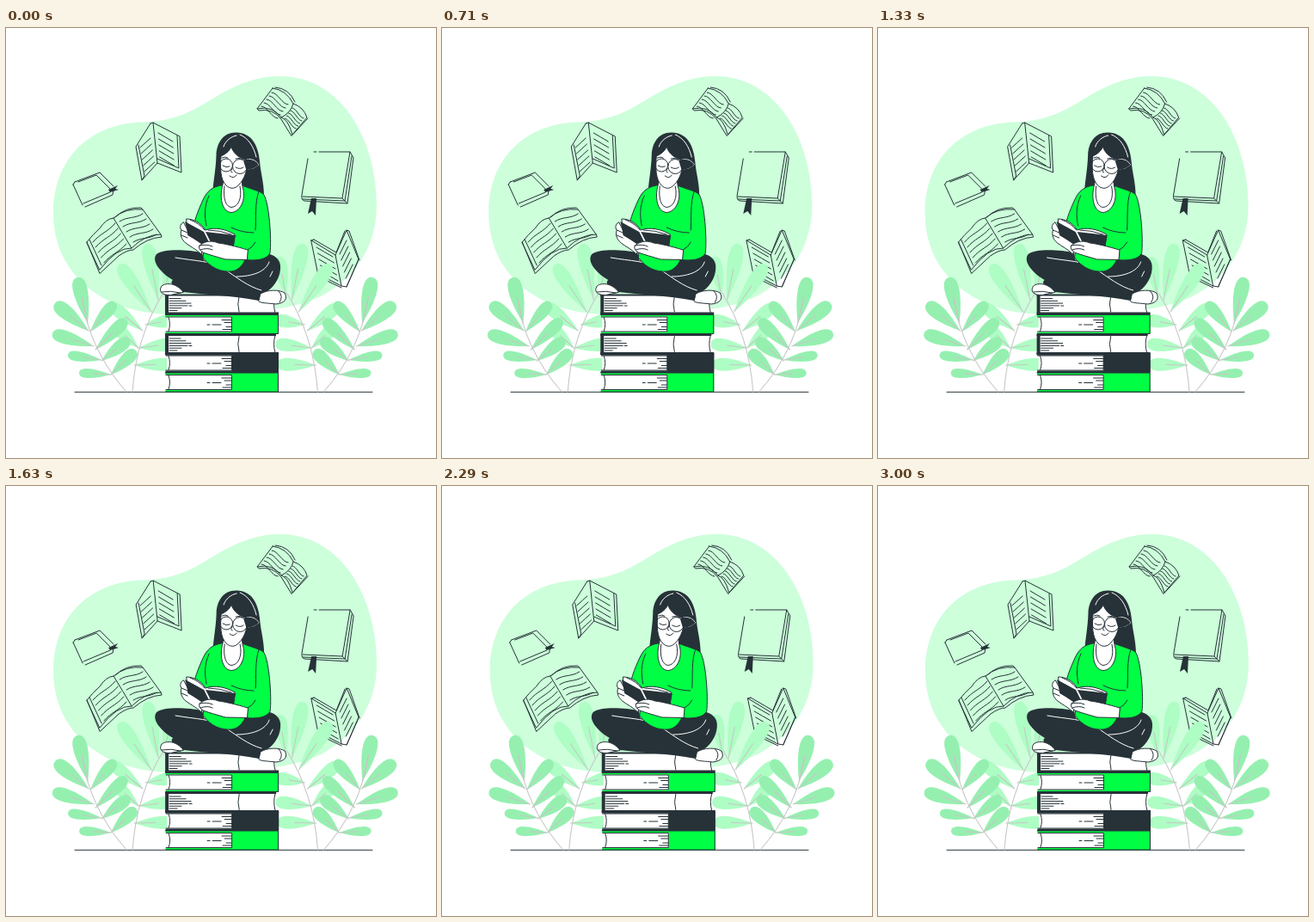
An HTML page that plays this animation: 500x500 px, repeating every 3040 ms.

```html
<!DOCTYPE html>
<html lang="en">
<head>
<meta charset="utf-8">
<title>Reading on a stack of books</title>
<style>
  html, body { margin: 0; height: 100%; overflow: hidden; background: #fff; }
  svg { display: block; width: 100vw; height: 100vh; }
  .ink { fill: none; stroke: #263238; stroke-width: 1; stroke-linecap: round; stroke-linejoin: round; }
  .dark { fill: #263238; }
  .skin { fill: #fff; }
  .shine { fill: none; stroke: #fff; stroke-width: 1; stroke-linecap: round; }
  .stem { fill: none; stroke: #c7c7c7; stroke-width: 1.1; stroke-linecap: round; }
  .outer { fill: #95f0b0; }
  .inner { fill: #aefdc4; }
</style>
</head>
<body>
<svg viewBox="0 0 500 500">
  <path class="ink" d="M80 423.3H426"/>
  <g id="scene">
    <path fill="#ccffda" d="M55 215C55 154 95 112 157 109.5C200 109 222 93 244 80S290 56 318 56C390 56 431 130 431 206C431 255 405 290 370 310C335 328 290 333 190 333C110 331 55 285 55 215Z"/>

    <g class="ink" id="flying">
      <path d="M310 70L292 94Q310 90 320 104Q328 106 333 124L350 104Q346 92 334 88Q326 72 310 70ZM334 88Q331 99 320 104M313 69Q329 70 336 86M292 94L294 96Q310 93 320 106L332 125.500L351 105"/>
      <path d="M168 111L151 138L158 177L176 157L171 110L202 126L204 168L176 157M168 111L171 110M154 136L161 172L158 177M199 125L201 163L176 152"/>
      <path d="M80 179L109 168L125 184M78 182L89 206M84 179L105 171L121 187M78 182L80 179M92 208L124 194L125 187M90 204L121 191"/>
      <path d="M94 249Q101 240 109 233Q116 222 125 221Q139 209 159 211L180 240Q162 240 146 256Q129 255 109 281ZM125 221Q136 239 146 256M94 249L109 285.500L131 265Q141 258 148 258Q164 244 181 243L180 240M159 211L157 209Q139 208 127 220M97 246L111 276"/>
      <path d="M364 144L400 144L391 198L345 196M358 144L361 144M351 152L344 194Q343 200 347 201L397 204L404 151L400 144M345 199L394 201L402 149M391 198L397 204"/>
      <path d="M355 247L383 264L390 300L363 286ZM383 264L396 235L410 269L396 301L390 300M358 246L384 261L394 236M396 235L399 236L411 270M410 269L396 301M355 247L358 246M363 286L361 288L390 302"/>
    </g>
    <path class="dark" d="M119 188L130 183L127 187L131 188L121 191ZM355 198H361L360 218L356 213L351 216Z"/>

    <g id="plants"></g>
    <g id="stack"></g>

    <g id="reader">
      <path class="dark" d="M268 121.500C253 121 245 133 244.500 148C244 165 241 178 240.500 190L300 195C300 180 296 168 295 155C293 135 285 122 268 121.500Z"/>
      <path class="shine" d="M253 138C255 131 262 126 268 125M272 124C282 128 288 138 291 150M280 153Q289 151 294 159Q288 164 282 164"/>

      <path class="dark" d="M228 261C212 258 184 256 175 263C168 272 182 286 194 293C189 297 197 304 206 307C230 310 262 311 294 317L304 306C313 300 320 288 319 276C318 264 303 259 285 262L262 280L230 270Z"/>
      <path class="shine" d="M197 267C220 271 240 271 252 279C268 290 282 301 297 305M268 289C285 289 302 284 306 272M307 289L310 283"/>
      <path class="skin ink" style="fill:#fff" d="M206 307C198 296 186 296 181 300C177 306 181 311 191 310.500ZM296 309C304 304 318 304 324 308C328 315 324 320 314 321C306 320 296 320 294 318Z"/>
      <path class="ink" d="M181 307Q191 305 203 308M317 306Q323 312 318 319"/>

      <path class="ink" style="fill:#00ff44" d="M250 183C240 185 234 189 229 200C223 213 218 226 217 238L231 248L229 267C238 279 250 284 262 283C270 282 275 276 278 269.500C292 271 303 269 307 262C309 245 306 205 300 194C297 190 290 189 277 184Z"/>
      <path class="ink" d="M294 190C289 203 291 222 290 235M262 232Q274 238 288 238M236 195C230 208 231 220 233 230M290 249Q287 255 281 258"/>
      <path class="ink" style="fill:#fff" d="M252 182C247 201 253 214 262 214.500C272 214 280 200 275 184L273 170H254Z"/>
      <path class="ink" d="M254 184C252 199 256 208 262 208.500C270 208 275 198 272 184"/>

      <path class="ink" style="fill:#fff" d="M250 149C249 163 249 176 256 183C260 187 266 188 271 182C277 176 281 165 281 154C272 152 264 146 262 138C260 143 255 147 250 149Z"/>
      <path class="dark" d="M276 154Q286 150 294 159Q286 166 279 164Z"/>
      <g class="ink">
        <circle cx="256" cy="159.500" r="7.500"/>
        <circle cx="272" cy="161" r="8.500"/>
        <path d="M252 160Q256 163 260 161M267 162Q272 165 276 162M251 151Q255 149 258 151M267 152Q271 150 275 153M263 163Q260 168 263 168M260 172Q265 176 268 171"/>
      </g>

      <path class="ink" style="fill:#fff" d="M206 226C202 228 202 233 204 235C202 240 204 246 209 250C214 254 221 257 227 263L231 249L213 238Z"/>
      <path class="ink" d="M204 235L211 238M204 241L211 244"/>
      <path class="ink" style="fill:#fff" d="M210 222C218 222 226 226 232 235C242 231 256 234 266 240L264 257L238 255L212 241Z"/>
      <path class="dark" d="M208 225L230 237L239 255L227 251L212 241ZM232 237L267 241L264 258.500L241 255Z"/>
      <path class="ink" d="M214 223Q225 227 231 235M235 235Q248 235 262 240"/>
      <path class="ink" style="fill:#fff" d="M281 258C268 254 255 251 247 250C237 246 230 249 225 253Q223 257 229 261C237 264 245 266 255 269L280 269.500Z"/>
      <path class="ink" d="M225 253Q234 251 240 254M226 258Q234 255 240 258"/>
    </g>
  </g>
</svg>
<script>
const INK = '#263238', GREEN = '#00ff44';
const byId = id => document.getElementById(id);
const add = (id, markup) => byId(id).insertAdjacentHTML('beforeend', markup);
const line = (d, cls = 'ink') => `<path class="${cls}" d="${d}"/>`;
const box = (x, y, w, h, fill) =>
  `<rect x="${x}" y="${y}" width="${w}" height="${h}" fill="${fill}"/>`;

// Rows of text on a page: first row from (x, y) by (w, h), each next row moved by (dx, dy).
function rows(n, x, y, w, h, dx, dy, bend = 0) {
  let d = '';
  for (let i = 0; i < n; i++) {
    d += `M${x + dx * i} ${y + dy * i}c${w * .35} ${h * .35 - bend} ${w * .65} ${h * .65 + bend} ${w} ${h}`;
  }
  return line(d);
}

add('flying',
  rows(5, 309, 75, 19, 14, -3, 4, 5) + rows(5, 333, 93, 13, 12, -2.2, 3, 4) +
  rows(5, 177, 122, 17, 10, .4, 7) + rows(5, 156, 139, 12, -11, 1.2, 7) +
  rows(5, 101, 249, 26, -22, 3.2, 6, 3) + rows(5, 132, 225, 27, -9, 4, 6, 3) +
  rows(5, 361, 255, 19, 11, 1.5, 7) + rows(5, 388, 263, 8, -16, 1.8, 7));

// Drop-shaped leaf, rounded at the tip, with a vein from the base.
function leaf(cls, [tx, ty, bx, by, w = 11.5]) {
  const dx = tx - bx, dy = ty - by, len = Math.hypot(dx, dy);
  const at = (k, side) => `${bx + dx * k - dy / len * side} ${by + dy * k + dx / len * side}`;
  return line(`M${bx} ${by}C${at(.4, w * .6)} ${at(1, w * 1.1)} ${tx} ${ty}` +
    `C${at(1, -w * 1.1)} ${at(.4, -w * .6)} ${bx} ${by}Z`, cls) +
    line(`M${bx} ${by}L${at(.55, 0)}`, 'stem');
}
const plant = (cls, stem, leaves) => leaves.map(l => leaf(cls, l)).join('') + line(stem, 'stem');

const inner = plant('inner', 'M147 423C150 380 163 340 183 308', [
  [132, 275, 169, 330, 13], [164, 251, 177, 316, 13], [192, 266, 184, 312],
  [122, 322, 159, 352], [126, 346, 154, 372], [196, 339, 162, 345],
  [196, 367, 154, 372], [194, 391, 149, 392]
]);
const outer = plant('outer', 'M140 423C115 395 95 360 88 313', [
  [83, 290, 95, 343, 13], [57, 320, 96, 352, 13], [54, 355, 102, 370, 12],
  [72, 380, 111, 386, 9], [85, 401, 122, 403, 8.500],
  [127, 319, 98, 353, 11], [140, 339, 104, 374], [143, 362, 111, 387], [151, 375, 122, 403]
]);
add('plants', `<g id="side">${inner}${outer}</g><use href="#side" transform="translate(509.4) scale(-1 1)"/>`);

// Hardback with a pale spine and a dark cover.
function paleBook(y) {
  return box(186, y, 127, 23, '#fff') + box(185, y - .5, 4, 24, INK) +
    box(185, y - .5, 129, 2, INK) + box(185, y + 20.500, 132, 3, INK) +
    line(`M271 ${y + 2}q-2.500 9 0 18M313 ${y + 1}q-3 10 0 20` +
      [13, 19, 25, 21, 14, 9].map((w, i) => `M190 ${y + 4.500 + i * 2.800}h${w}`).join('') +
      `M213 ${y + 13}h3`);
}

// Hardback with a coloured spine on the right and open pages on the left.
function solidBook(y, color) {
  return box(187, y, 80, 22, '#fff') + box(262.500, y, 54.500, 22, color) +
    box(185.500, y, 131, 2.200, color) + box(185.500, y + 20, 131, 2.200, color) +
    line(`M185.500 ${y}H316.500V${y + 22}H185.500M186 ${y + 2.500}H262.500V${y + 19.500}H186` +
      `M189 ${y + 3}q3 8 0 16M251 ${y + 6}h11M254 ${y + 9}h8` +
      `M234 ${y + 11.500}h3M240 ${y + 11.500}h10M256 ${y + 14}h6M252 ${y + 17}h10`);
}
add('stack', solidBook(401, GREEN) + solidBook(378.500, INK) + paleBook(356.500) +
  solidBook(333.500, GREEN) + paleBook(310));

// Sideways shake: eased steps between evenly spaced offsets.
const LOOP = 3040, LAG = 10;
const OFFSETS = [0, -1, 2, -4, 4, -4, 4, -4, 2, -1, 0];
const cubic = (a, b, s) => 3 * a * s * (1 - s) ** 2 + 3 * b * s * s * (1 - s) + s ** 3;
function ease(x) {
  let lo = 0, hi = 1;
  for (let i = 0; i < 20; i++) {
    const mid = (lo + hi) / 2;
    if (cubic(.36, .19, mid) < x) lo = mid; else hi = mid;
  }
  return cubic(.07, .97, lo);
}
const start = performance.now();
function draw() {
  const t = Math.max(0, performance.now() - start);
  const pos = (t + LOOP - LAG) % LOOP / LOOP * 10;
  const i = Math.floor(pos);
  const x = OFFSETS[i] + (OFFSETS[i + 1] - OFFSETS[i]) * ease(pos - i);
  byId('scene').setAttribute('transform', `translate(${x.toFixed(3)} 0)`);
  requestAnimationFrame(draw);
}
draw();
</script>
</body>
</html>
```
